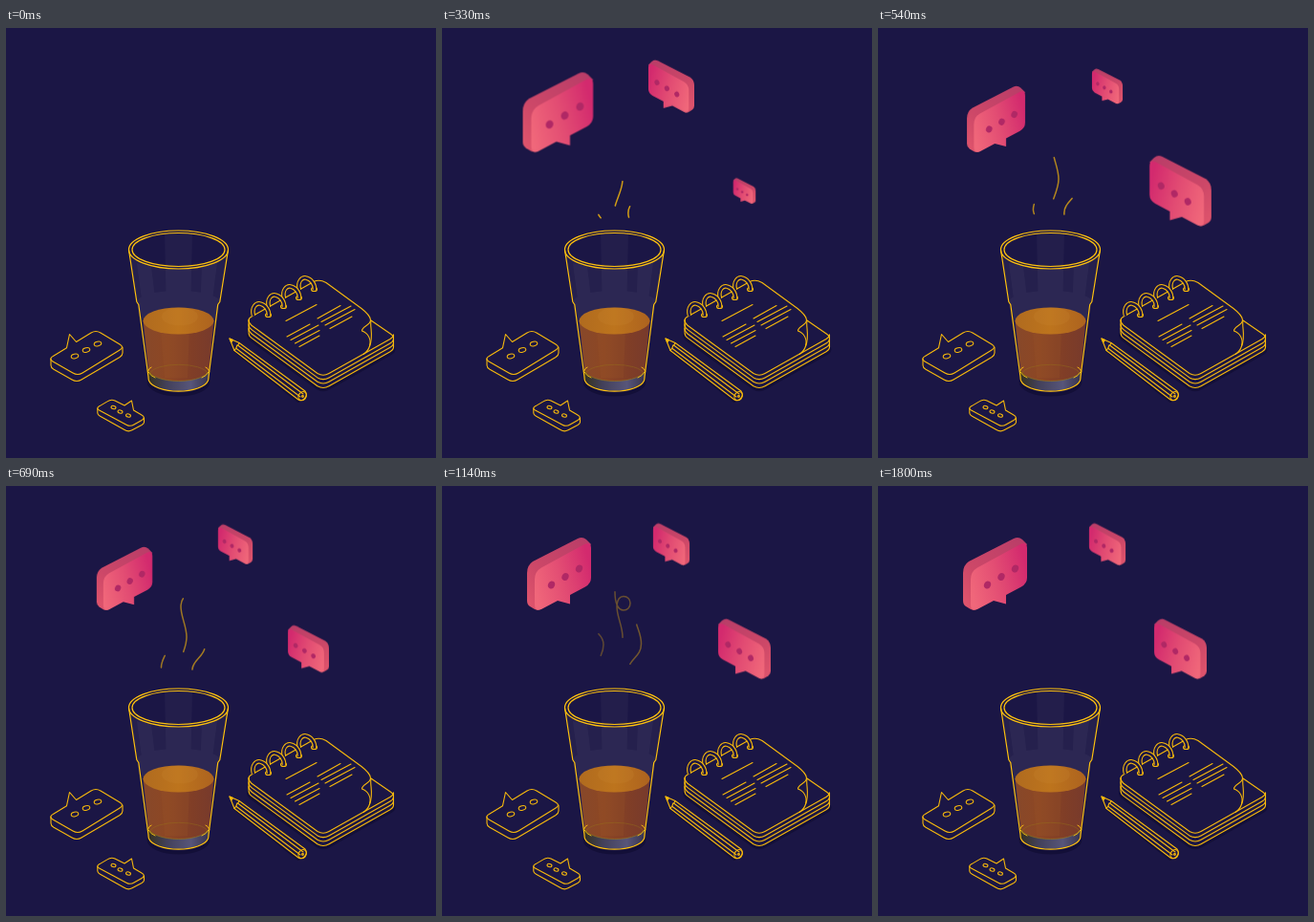
Write an HTML page that moves like this. It is 450x450 px and loops after 1.83 s.

```html
<!DOCTYPE html>
<html lang="en">
<head>
<meta charset="utf-8">
<title>Tea and notes</title>
<style>
html, body { margin: 0; width: 100%; height: 100%; overflow: hidden; background: #1b1645; }
svg { display: block; width: 100vw; height: 100vh; }
.line { fill: none; stroke: #f7b90c; stroke-width: 1.1; stroke-linecap: round; stroke-linejoin: round; }
.solid { fill: #1b1645; }
.pop, .steam path { animation: 1830ms linear infinite; }
.steam path { stroke-width: 1.5; }
#chatA { transform-origin: 134px 130px; animation-name: popA; }
#chatB { transform-origin: 240px 61px; animation-name: popB; }
#chatC { transform-origin: 316.5px 170.5px; animation-name: popC; }
#mid { animation-name: rise-mid; }
#left { animation-name: rise-left; }
#right { animation-name: rise-right; }

@keyframes popA {
  0%, 1.6% { transform: scale(0); }
  9.84% { transform: scale(1.07); }
  13.1% { transform: scale(1.33); }
  18.03% { transform: scale(1.1); }
  23.5% { transform: scale(.97); }
  29.51% { transform: scale(.91); }
  35% { transform: scale(.865); }
  37.7% { transform: scale(.87); }
  57.9%, 100% { transform: scale(1); }
}
@keyframes popB {
  0%, 4.6% { transform: scale(0); }
  9.84% { transform: scale(.62); }
  13.1% { transform: scale(1.03); }
  16.4% { transform: scale(1.29); }
  18.03% { transform: scale(1.26); }
  20.5% { transform: scale(1.16); }
  27.3% { transform: scale(.77); }
  29.51% { transform: scale(.84); }
  37.7% { transform: scale(.95); }
  48.1%, 100% { transform: scale(1); }
}
@keyframes popC {
  0%, 14.2% { transform: scale(0); }
  18.03% { transform: scale(.42); }
  22.4% { transform: scale(1.03); }
  25.7% { transform: scale(1.28); }
  29.51% { transform: scale(1.18); }
  36.6% { transform: scale(.77); }
  37.7% { transform: scale(.78); }
  47% { transform: scale(.95); }
  57.4%, 100% { transform: scale(1); }
}
/* dash length is the visible part, negative offset its start */
@keyframes rise-mid {
  0%, 2.9% { stroke-dasharray: 0 300; stroke-dashoffset: 0; opacity: 0; }
  3% { stroke-dasharray: 0 300; stroke-dashoffset: 0; opacity: 1; }
  9.84% { stroke-dasharray: 13.5 300; stroke-dashoffset: -1; opacity: .95; }
  18.03% { stroke-dasharray: 26 300; stroke-dashoffset: -6; opacity: .83; }
  29.51% { stroke-dasharray: 43.5 300; stroke-dashoffset: -13.5; opacity: .69; }
  37.7% { stroke-dasharray: 56 300; stroke-dashoffset: -19; opacity: .6; }
  62.3% { stroke-dasharray: 91 300; stroke-dashoffset: -34; opacity: .35; }
  70% { stroke-dasharray: 100 300; stroke-dashoffset: -39; opacity: .24; }
  88.5%, 100% { stroke-dasharray: 60 300; stroke-dashoffset: -78; opacity: 0; }
}
@keyframes rise-left {
  0%, 8% { stroke-dasharray: 0 300; stroke-dashoffset: 0; opacity: 0; }
  9.84% { stroke-dasharray: .6 300; stroke-dashoffset: -.5; opacity: .95; }
  18.03% { stroke-dasharray: 4 300; stroke-dashoffset: -3.5; opacity: .83; }
  29.51% { stroke-dasharray: 10 300; stroke-dashoffset: -8.5; opacity: .69; }
  37.7% { stroke-dasharray: 13 300; stroke-dashoffset: -13; opacity: .6; }
  62.3% { stroke-dasharray: 24 300; stroke-dashoffset: -26; opacity: .31; }
  74% { stroke-dasharray: 29 300; stroke-dashoffset: -32; opacity: .17; }
  88.5%, 100% { stroke-dasharray: 10 300; stroke-dashoffset: -51; opacity: 0; }
}
@keyframes rise-right {
  0%, 4% { stroke-dasharray: 0 300; stroke-dashoffset: 0; opacity: 0; }
  4.1% { stroke-dasharray: 0 300; stroke-dashoffset: 0; opacity: 1; }
  9.84% { stroke-dasharray: 6 300; stroke-dashoffset: -.5; opacity: .95; }
  18.03% { stroke-dasharray: 11.5 300; stroke-dashoffset: -3; opacity: .85; }
  29.51% { stroke-dasharray: 19 300; stroke-dashoffset: -6; opacity: .72; }
  37.7% { stroke-dasharray: 25 300; stroke-dashoffset: -9; opacity: .63; }
  62.3% { stroke-dasharray: 45 300; stroke-dashoffset: -15; opacity: .4; }
  88.5% { stroke-dasharray: 30 300; stroke-dashoffset: -60; opacity: .1; }
  98.3%, 100% { stroke-dasharray: 4 300; stroke-dashoffset: -86; opacity: 0; }
}
</style>
</head>
<body>
<svg viewBox="0 0 450 450">
  <defs>
    <linearGradient id="front" x1="0" y1=".7" x2="1" y2=".4">
      <stop offset="0" stop-color="#f0677a"/>
      <stop offset=".5" stop-color="#e24c73"/>
      <stop offset="1" stop-color="#d32a6e"/>
    </linearGradient>
    <linearGradient id="side" x1="0" y1="1" x2="1" y2="0">
      <stop offset="0" stop-color="#e2566d"/>
      <stop offset=".35" stop-color="#cd4868"/>
      <stop offset="1" stop-color="#b83c68"/>
    </linearGradient>
    <linearGradient id="tea">
      <stop offset="0" stop-color="#87482a"/>
      <stop offset=".35" stop-color="#8d4724"/>
      <stop offset=".7" stop-color="#803e27"/>
      <stop offset="1" stop-color="#773a2c"/>
    </linearGradient>
    <linearGradient id="surface">
      <stop offset="0" stop-color="#b06b1f"/>
      <stop offset=".5" stop-color="#bd741d"/>
      <stop offset="1" stop-color="#ad631f"/>
    </linearGradient>
    <linearGradient id="base">
      <stop offset="0" stop-color="#35321f"/>
      <stop offset=".3" stop-color="#42405a"/>
      <stop offset=".7" stop-color="#57557a"/>
      <stop offset="1" stop-color="#37344f"/>
    </linearGradient>

    <g id="chat">
      <path fill="url(#side)" d="M89 91Q89 83 95 79L142 55Q147 52.500 151 56L156 61L103 129Q100 130.500 97 129L92 126Q89 124 89 120Z"/>
      <path fill="url(#front)" d="M97 98Q97 89.500 104 85.500L149 61Q156 57.500 156 65V96Q156 102 150 105.500L134 114V123.500L121 120L104 129Q97 132 97 124Z"/>
      <g fill="#b02865">
        <ellipse cx="114.500" cy="103.500" rx="3.500" ry="4" transform="rotate(25 114.500 103.500)"/>
        <ellipse cx="129" cy="95" rx="3.500" ry="4" transform="rotate(25 129 95)"/>
        <ellipse cx="143.500" cy="86.500" rx="3.500" ry="4" transform="rotate(25 143.500 86.500)"/>
      </g>
    </g>

    <g id="ring" fill="none" stroke-linecap="butt">
      <ellipse cx="274.500" cy="300.500" rx="3" ry="2" class="line"/>
      <path stroke="#f7b90c" stroke-width="4.600" d="M259 301C256.500 292 262 287.500 266 288.500C271 289.500 275.500 295 275 301"/>
      <path stroke="#1b1645" stroke-width="2.400" d="M259 301.500C256.500 292 262 287.500 266 288.500C271 289.500 275.500 295 275 301"/>
    </g>

    <path id="edge" d="M254 305.500Q254 309 257 311.200L326 361.500Q332 365 338 361.500L402 325.500Q405.500 323.500 405.500 321"/>
  </defs>

  <rect width="450" height="450" fill="#1b1645"/>

  <!-- soft shadows -->
  <g fill="none" stroke="#130f38" stroke-width="4" stroke-linecap="round" stroke-linejoin="round">
    <use href="#edge" y="15"/>
    <path d="M240 338L306 390"/>
    <ellipse cx="180.500" cy="370" rx="31" ry="13.500"/>
  </g>

  <!-- outlined bubbles on the table -->
  <g class="line">
    <path d="M50 343L63.500 334.700L66.500 320.500L73.500 328.500L89 319Q94 316 99 319L119 331Q124 334 119 337L80 361Q75 364 70 361L49 349Q44 346 50 343"/>
    <path d="M47 346V353Q47 355.500 50 357.300L69 368Q74 371 79 368L119 344.500Q122 342.500 122 340V334"/>
    <ellipse cx="72" cy="343.500" rx="3.800" ry="2.300" transform="rotate(-12 72 343.500)"/>
    <ellipse cx="84" cy="337" rx="3.800" ry="2.300" transform="rotate(-12 84 337)"/>
    <ellipse cx="96" cy="330.500" rx="3.800" ry="2.300" transform="rotate(-12 96 330.500)"/>
    <path d="M98 395.600L106 390.900Q110 388 114 390L124 395L131.500 390L133.500 400L142 405Q146.500 407.500 142 410.500L134 415Q130 417.500 126 415.200L98 400.300Q93.500 398 98 395.600"/>
    <path d="M95.800 398V403Q96 405 98.500 406.300L124 420.500Q128 423 132 420.800L142 415.500Q144.500 414 144.500 412.500V408"/>
    <ellipse cx="112.500" cy="397" rx="2.500" ry="1.600" transform="rotate(15 112.500 397)"/>
    <ellipse cx="119.500" cy="401.500" rx="2.500" ry="1.600" transform="rotate(15 119.500 401.500)"/>
    <ellipse cx="128" cy="405.500" rx="2.500" ry="1.600" transform="rotate(15 128 405.500)"/>
  </g>

  <!-- notebook -->
  <g class="line">
    <path class="solid" stroke="none" d="M254 305V320L332 376L405 336V322L332 266Z"/>
    <use href="#edge"/>
    <use href="#edge" y="4.400"/>
    <use href="#edge" y="8.800"/>
    <use href="#edge" y="13.200"/>
    <path d="M254 306V318M405.500 321V334"/>
    <path d="M254 306Q254 303.500 257 302L322 265.500Q328 262.500 335 266.500L372 293.500Q381 300.500 381.500 305.500C381.500 311.500 372.500 312 372.500 317C379 319 382.500 326 380.500 333Q379 338 374 341.500"/>
    <path d="M380.500 333C385 322 380.500 313 382 306L403 320.500Q405.500 322 405.500 324"/>
    <path d="M293 306.500L325 289.500M326 304L350 290.500M330 307.500L361 291M334 311L365 294.500M339 314.500L362 302M294 323L318 310M298 326.500L327 311M302.500 330L328 316.500M307 333.500L328 322"/>
  </g>
  <use href="#ring" x="48" y="-27"/>
  <use href="#ring" x="32" y="-18"/>
  <use href="#ring" x="16" y="-9"/>
  <use href="#ring"/>

  <!-- pencil -->
  <g class="line">
    <path class="solid" d="M234 325L244 329.500L313 380Q316 384 313 388Q310 391 306 389L239 337.500Z"/>
    <path d="M244 329.500Q243.500 332 241.800 332Q241.500 335.500 239 337.500M242.500 332L311 383M240.500 335L308 386"/>
    <ellipse cx="310" cy="385" rx="3.600" ry="4.800" transform="rotate(35 310 385)"/>
    <circle cx="310.500" cy="385.500" r=".9"/>
    <path fill="#f7b90c" d="M234 325L237.500 326.500L235.800 329Z"/>
  </g>

  <!-- glass of tea -->
  <path class="solid" d="M149 358V367A31.500 14.500 0 0 0 212 367V358Z"/>
  <path fill="#fff" opacity=".045" d="M128.500 232A52 20 0 0 0 232.500 232L223.500 287L212 366A31.500 15 0 0 1 149 366L137 288Z"/>
  <g fill="#fff" opacity=".03">
    <path d="M166 214H195L193 300H168Z"/>
    <path d="M137 246L152 250L158 300L145 306Z"/>
    <path d="M205 249L221 245L214 300L203 298Z"/>
    <path d="M138 286A42.500 11 0 0 1 223 286L217.500 307H143.500Z"/>
  </g>
  <path fill="url(#base)" d="M149 358L149.500 367A31.500 14.500 0 0 0 212 367L212.500 358Z"/>
  <path fill="url(#tea)" d="M143.500 306L149 357A31.700 12.500 0 0 0 212.500 357L217.500 306Z"/>
  <path fill="#a3602a" opacity=".15" d="M162 318H192L190 366H166Z"/>
  <ellipse cx="180.500" cy="306.500" rx="37" ry="14" fill="url(#surface)"/>
  <ellipse cx="182" cy="302" rx="19" ry="9.500" fill="#c98535" opacity=".2"/>
  <g fill="none" stroke="#9a7c18" opacity=".6">
    <path d="M149 357A31.700 12.500 0 0 0 212.500 357"/>
    <path d="M151 361A30 10 0 0 1 210.500 361" opacity=".6"/>
  </g>
  <g class="line" style="stroke: #ffc20e; stroke-width: 1.2">
    <ellipse cx="180.500" cy="232" rx="52" ry="20"/>
    <ellipse cx="180.500" cy="232" rx="48.500" ry="17.500"/>
    <path d="M128.500 232L136.800 286.500L138.800 289.500L149 365Q149 367 149.500 369A31.500 13.500 0 0 0 211.500 369Q212 367 212 365L221.700 289.500L223.800 286.500L232.500 232"/>
    <path d="M148.500 359Q150 355.500 152 355M149 360Q151 364 156 366M212.800 359Q211 355.500 209 355M212 360Q210 364 205 366" stroke-width=".9"/>
  </g>

  <g class="line steam">
    <path id="mid" pathLength="138" d="M180.500 192C180 183 189 171 189 158C189 146 182.500 136 183 125C183.500 119 186 115.500 190 115.500C194 115.500 197 118.500 197 122.500C197 127 194 130 190 130C184 130 181 122 181 111C181 106 182 102 184 98"/>
    <path id="left" pathLength="61" d="M169 201C163 197 161 191 163.500 184C165 179 169 174 169 166C169 160 166 157 163 154C160 151 157.500 149 157.500 146"/>
    <path id="right" pathLength="90" d="M196.500 201C194 195 194.500 190 197 186C201 179 208.500 176 208.500 165C208.500 157 206 152 204 146C203 143 206 141 209 141C213 141 215 145 214 150C213 154 210 157 206 157"/>
  </g>

  <g class="pop" id="chatA"><use href="#chat"/></g>
  <g class="pop" id="chatB"><use href="#chat" transform="translate(240 61) scale(-.57 .575) translate(-122.500 -92)"/></g>
  <g class="pop" id="chatC"><use href="#chat" transform="translate(316.500 170.500) scale(-.82 .825) translate(-122.500 -92)"/></g>
</svg>
</body>
</html>
```
